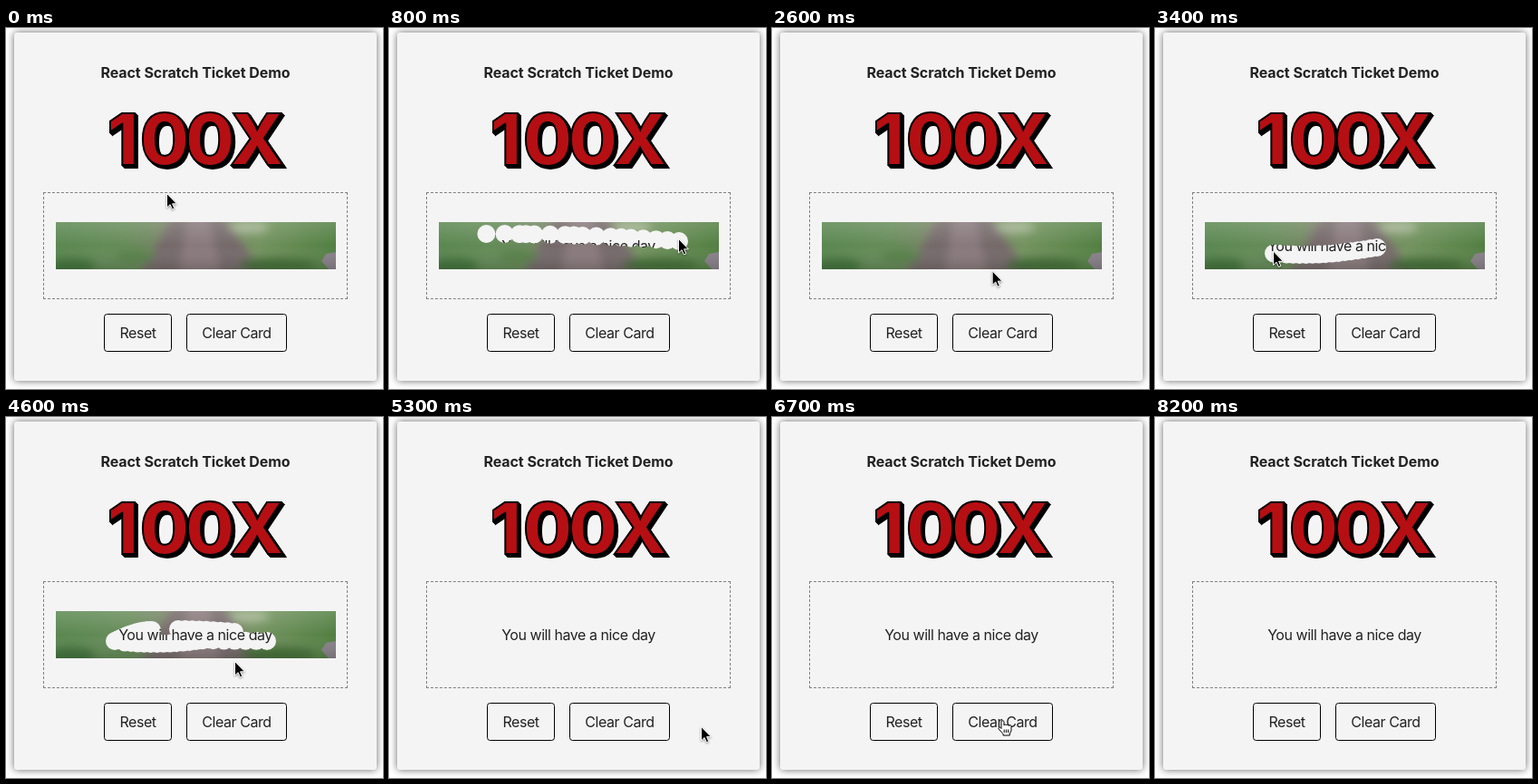
Recreate the animation shown at these times as an HTML page. Size 416 by 398 pixels, loop 8.3 s.

```html
<!DOCTYPE html>
<html lang="en">
<head>
<meta charset="utf-8">
<title>Scratch ticket</title>
<style>
  html, body { margin: 0; width: 100%; height: 100%; overflow: hidden; background: #fff; }
  svg { display: block; width: 416px; height: 398px; }
  text { font: 16px Inter, "Open Sans", sans-serif; letter-spacing: -.028em; text-anchor: middle; fill: #222; }
  .title { font-weight: 700; letter-spacing: -.004em; }
  .prize { font-size: 79px; font-weight: 800; letter-spacing: 0; stroke: #000; stroke-width: 2px; }
  .card { fill: #f4f4f4; filter: drop-shadow(0 0 4px rgba(0, 0, 0, .6)); }
  .ticket { box-sizing: border-box; height: 118px; border: 1px dashed gray; }
  .button { fill: none; stroke: #000; }
  .soft { filter: blur(5px); }
  #arrow { filter: drop-shadow(0 1px 1px rgba(0, 0, 0, .4)); }
</style>
</head>
<body>
<svg viewBox="0 0 416 398">
  <defs>
    <linearGradient id="grass">
      <stop offset="0" stop-color="#5a8750"/>
      <stop offset=".25" stop-color="#678c5a"/>
      <stop offset=".5" stop-color="#83806f"/>
      <stop offset=".72" stop-color="#73935f"/>
      <stop offset="1" stop-color="#527f42"/>
    </linearGradient>
    <linearGradient id="haze" x2="0" y2="1">
      <stop offset="0" stop-color="#fff" stop-opacity=".16"/>
      <stop offset=".5" stop-color="#fff" stop-opacity="0"/>
      <stop offset="1" stop-color="#000" stop-opacity=".14"/>
    </linearGradient>
    <clipPath id="frame"><rect x="55" y="214" width="309" height="52"/></clipPath>
    <mask id="scratched" maskUnits="userSpaceOnUse" x="0" y="0" width="416" height="398">
      <rect width="416" height="398" fill="#fff"/>
      <g id="marks"></g>
    </mask>
    <text id="prize" class="prize" x="129 175 225 277" y="150.5">100X</text>
  </defs>

  <rect class="card" x="9" y="5" width="400" height="384" rx="3"/>
  <text class="title" x="209" y="55">React Scratch Ticket Demo</text>
  <use href="#prize" x="3" y="3"/>
  <use href="#prize" x="2" y="2"/>
  <use href="#prize" x="1" y="1"/>
  <text class="prize" x="129 175 225 277" y="150.5" style="fill:#b50f13">100X</text>

  <foreignObject x="41" y="181" width="336" height="118"><div class="ticket"></div></foreignObject>
  <text x="209" y="246">You will have a nice day</text>

  <g id="cover" mask="url(#scratched)">
    <g clip-path="url(#frame)">
      <rect x="55" y="214" width="309" height="52" fill="url(#grass)"/>
      <g class="soft">
        <path d="M184 208H238L286 272H148Z" fill="#75696a"/>
        <path d="M200 208H224L238 272H190Z" fill="#88797c"/>
        <ellipse cx="72" cy="262" rx="26" ry="9" fill="#41713a"/>
        <ellipse cx="142" cy="252" rx="22" ry="7" fill="#557f47"/>
        <ellipse cx="300" cy="261" rx="42" ry="8" fill="#426d36"/>
        <ellipse cx="268" cy="220" rx="22" ry="6" fill="#a3b492"/>
      </g>
      <path d="M348 257L353 249L364 247V266H356Z" fill="#878088"/>
      <rect x="55" y="214" width="309" height="52" fill="url(#haze)"/>
    </g>
  </g>

  <rect class="button" x="108.5" y="315.5" width="74" height="41" rx="3"/>
  <rect class="button" x="199.5" y="315.5" width="110" height="41" rx="3"/>
  <text x="145.5" y="342">Reset</text>
  <text x="254.5" y="342">Clear Card</text>

  <g id="cursor">
    <path id="arrow" transform="translate(-.5 -2.5)" d="M0 0V15.5L3.6 12.2L5.9 17.4L8.3 16.3L6.1 11.3H10.9Z" stroke="#fff" stroke-linejoin="round"/>
    <g id="hand" transform="translate(-5 -2)" stroke="#000" stroke-linejoin="round">
      <path d="M4 9.5V2.2a1.5 1.5 0 0 1 3 0V6a1.4 1.4 0 0 1 2.7 0a1.4 1.4 0 0 1 2.7.6a1.3 1.3 0 0 1 2.6 1V12L13.3 15V17H6V15.4L1 9.8a1.5 1.5 0 0 1 2.2-1.5Z" fill="#fff"/>
      <path d="M7.2 10.5V14M9.4 10.5V14M11.6 10.5V14" fill="none"/>
    </g>
  </g>
</svg>
<script>
const LOOP = 8300, STEP = 100, MARK_EVERY = 31, GONE = 7200;
const $ = id => document.getElementById(id);
const show = (el, on) => { el.style.display = on ? "" : "none"; };
const mix = (a, b, k) => a + (b - a) * k;
const ease = k => k * k * (3 - 2 * k);

// Times between which the ticket is fully revealed.
const cleared = [[1400, 2000], [5000, 6000], [6700, LOOP]];

// Each stroke gives the pointer position for its progress u from 0 to 1.
const strokes = [
  { from: 300, to: 800, at: u => [113 + 207 * u + 6 * (1 - u) * Math.sin(24 * u - 1.2), 227 + 8 * u * u] },
  { from: 850, to: 1400, at: u => [215 + 100 * Math.cos(2 * Math.PI * u), 238 + 14 * u] },
  { from: 2900, to: 3400, at: u => [245 - 114 * u, 242 + 8 * Math.sin(2.2 * u)] },
  { from: 3500, to: 3900, at: u => [120 + 41 * u, 247 - 12 * Math.sin(1.6 * u)] },
  { from: 4000, to: 4250, at: u => [190 + 62 * u, 234 + 3 * u * u] },
  { from: 4280, to: 4500, at: u => [205 + 83 * u, 246 + u] }
];

// Stops of the pointer between strokes: time, x, y.
const stops = [
  [0, 178, 185], [200, 104, 222], [1800, 164, 337], [2100, 164, 337], [2700, 250, 265],
  [4600, 253, 272], [4900, 256, 335], [5050, 256, 335], [5400, 367, 346],
  [6050, 181, 334], [6350, 181, 334], [6700, 254, 336], [GONE, 412, 310]
];

const marks = [];
for (const { from, to, at } of strokes) {
  const count = Math.round((to - from) / MARK_EVERY);
  const wiped = cleared.find(([start]) => start >= to)[0];
  for (let i = 0; i <= count; i++) {
    const time = mix(from, to, i / count), [x, y] = at(i / count);
    const dot = document.createElementNS("http://www.w3.org/2000/svg", "circle");
    dot.setAttribute("cx", x);
    dot.setAttribute("cy", y);
    dot.setAttribute("r", 10);
    $("marks").append(dot);
    marks.push({ dot, time, wiped });
    stops.push([time, x, y]);
  }
}
stops.sort((a, b) => a[0] - b[0]);

function cursorAt(time) {
  const next = stops.findIndex(stop => stop[0] > time);
  if (next < 0) return stops.at(-1).slice(1);
  const [t0, x0, y0] = stops[next - 1], [t1, x1, y1] = stops[next];
  const k = ease((time - t0) / (t1 - t0));
  return [mix(x0, x1, k), mix(y0, y1, k)];
}

function render(now) {
  const time = Math.floor(now % LOOP / STEP) * STEP;
  const [x, y] = cursorAt(time);
  const onButton = y > 315 && y < 357 && (x > 108 && x < 183 || x > 199 && x < 310);

  show($("cover"), !cleared.some(([start, end]) => time >= start && time < end));
  for (const { dot, time: made, wiped } of marks) show(dot, time >= made && time < wiped);

  show($("cursor"), time < GONE);
  $("cursor").setAttribute("transform", `translate(${x} ${y})`);
  show($("hand"), onButton);
  show($("arrow"), !onButton);
  requestAnimationFrame(render);
}
render(performance.now());
</script>
</body>
</html>
```
